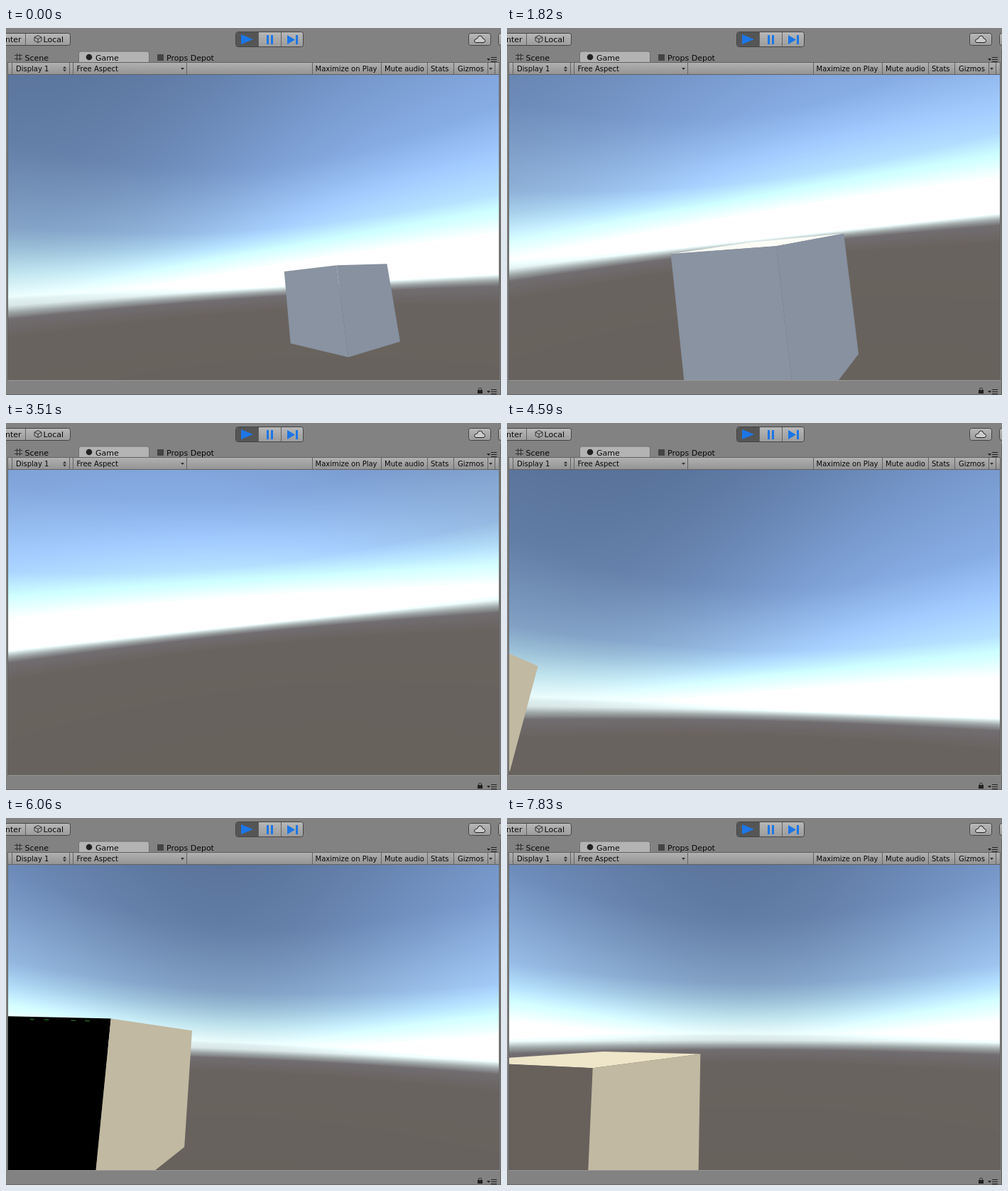
An HTML page with a canvas for the animation above (7.9 s loop, 697 by 517 pixels).

```html
<!DOCTYPE html>
<html lang="en">
<head>
<meta charset="utf-8">
<title>Game view</title>
<style>
  html, body { margin: 0; width: 697px; height: 517px; overflow: hidden; background: #828282; }
  canvas { position: absolute; left: 3px; top: 66px; }
  svg { position: absolute; left: 0; top: 0; }
  text { font: 10px "DejaVu Sans", sans-serif; fill: #080808; }
  text.big { font-size: 11px; }
  .button { fill: url(#raised); stroke: #444; }
  .line { fill: none; stroke: #626262; }
  .icon { fill: none; stroke: #333; }
</style>
</head>
<body>
<canvas id="view" width="691" height="430"></canvas>
<svg width="697" height="517" viewBox="0 0 697 517">
  <defs>
    <linearGradient id="raised" x2="0" y2="1"><stop stop-color="#b8b8b8"/><stop offset="1" stop-color="#9b9b9b"/></linearGradient>
    <linearGradient id="bar" x2="0" y2="1"><stop stop-color="#b0b0b0"/><stop offset="1" stop-color="#939393"/></linearGradient>
    <g id="menu"><path d="M0 2h5l-2.5 3z" fill="#222"/><path d="M6 .5h8M6 3.5h8M6 6.5h8" stroke="#222"/></g>
  </defs>

  <rect class="button" x="-8.5" y="7.5" width="99" height="17" rx="3"/>
  <path class="line" d="M27.5 8v16"/>
  <text class="big" x="21.5" y="20" text-anchor="end">Center</text>
  <path d="M45 10.5l5 2.5v5l-5 2.5-5-2.5v-5zM40 13l5 2.5 5-2.5M45 15.5v5" fill="#aaa" stroke="#333"/>
  <text class="big" x="52.5" y="20">Local</text>

  <rect class="button" x="323.5" y="5.5" width="95" height="21" rx="3"/>
  <path d="M326 6h29v20h-29q-2 0-2-2V8q0-2 2-2z" fill="#555"/>
  <path class="line" d="M355.5 6v20M387.5 6v20"/>
  <path d="M331 9l17 7-17 7zM367 10h3v13h-3zM373 10h3v13h-3zM396 10l11 6.5-11 6.5zM408 10h3v13h-3z" fill="#1c76e6"/>

  <rect class="button" x="651.5" y="7.5" width="31" height="17" rx="3"/>
  <path d="M662 20.5h10q3-.5 2.5-3t-3-2.500q-1-4-4-4t-4 4q-4 .5-4 3t2.500 2.500z" fill="#ccc" stroke="#222"/>
  <rect class="button" x="693.5" y="7.5" width="20" height="17" rx="3"/>

  <path d="M102.5 49V36q0-3 3-3h93q3 0 3 3v13" fill="#b3b3b3" stroke="#707070"/>
  <path class="icon" d="M15.5 36v10M19.5 36v10M12 38.5h11M12 43.5h11"/>
  <text class="big" x="26.5" y="46">Scene</text>
  <circle cx="117" cy="41" r="4.3" fill="#222"/>
  <text class="big" x="126" y="46">Game</text>
  <rect x="213" y="37" width="9" height="9" fill="#444"/>
  <text class="big" x="226" y="46">Props Depot</text>
  <use href="#menu" x="677" y="41"/>

  <rect x="3" y="49" width="691" height="17" fill="url(#bar)"/>
  <path class="line" d="M2 48.5h693M3 65.5h691"/>
  <path class="line" id="dividers"/>
  <text x="14" y="61">Display 1</text>
  <text x="99.5" y="61">Free Aspect</text>
  <text x="435.5" y="61">Maximize on Play</text>
  <text x="533" y="61">Mute audio</text>
  <text x="598" y="61">Stats</text>
  <text x="636" y="61">Gizmos</text>
  <path d="M80 57l2.500-3 2.500 3zM80 58.500h5l-2.500 3zM246 56h5l-2.500 3zM680 56h5l-2.500 3z" fill="#333"/>

  <path class="line" d="M2.5 49v447M694.5 49v447"/>
  <path d="M3 496.5h692" stroke="#979797"/>
  <path d="M0 516.5h697M696.5 30v487" stroke="#686868"/>
  <path d="M664 510h7v5h-7z" fill="#222"/>
  <path class="icon" d="M665.5 510v-1q0-2 2-2t2 2v1"/>
  <use href="#menu" x="677" y="509"/>
</svg>
<script>
const LOOP = 7900, STEPS = 103;
const W = 691, H = 430, FOCAL = 372, NEAR = .05;
const SUN_HEADING = 72 * Math.PI / 180, SUN_HEIGHT = .15;
const ctx = document.getElementById('view').getContext('2d');

document.getElementById('dividers').setAttribute('d',
  [8, 89, 94, 254, 431, 528, 593, 630, 678, 688].map(x => `M${x + .5} 49v17`).join(''));

// A hand-held camera walks around a unit cube centred on the origin.
// Step, position (ahead, right, up), heading in degrees, horizon slope and offset.
const walk = [
  [0, -2.66, -2.96, .355, 32, -.0666, 79],
  [10, -2.08, -2.39, .49, 34, -.1187, 48],
  [24, -1.32, -1.68, .573, 51, -.114, 10.5],
  [46, -2.3, -.4, .4, 85, -.1027, -4.5],
  [60, -3.055, 1.383, .147, 25, .023, 117],
  [79, -1.707, 1.527, .39, -12, .042, 39.4],
  [102, -1.441, 1.548, .646, -16.9, .0024, 26.2]
];

// Monotone cubic interpolation through the keys.
function sample(keys, step) {
  const last = keys.length - 1;
  let i = 0;
  while (i < last - 1 && step >= keys[i + 1][0]) i++;
  const a = keys[i], b = keys[i + 1], span = b[0] - a[0];
  const t = (step - a[0]) / span, u = 1 - t;
  const slope = (n, c) => (keys[n + 1][c] - keys[n][c]) / (keys[n + 1][0] - keys[n][0]);
  const tangent = (n, c) => {
    const p = slope(Math.max(0, n - 1), c), q = slope(Math.min(last - 1, n), c);
    return p * q > 0 ? 2 * p * q / (p + q) : 0;
  };
  return a.slice(1).map((from, j) => {
    const c = j + 1;
    return from * (1 + 2 * t) * u * u + b[c] * t * t * (3 - 2 * t)
      + span * t * u * (u * tangent(i, c) - t * tangent(i + 1, c));
  });
}

// Camera with its level axes (right, ahead, up) in view coordinates.
function cameraAt(step) {
  const [x, y, z, degrees, slope, offset] = sample(walk, step);
  const size = Math.hypot(slope, 1, offset / FOCAL);
  const up = [slope / size, 1 / size, offset / FOCAL / size];
  const c = Math.hypot(up[0], up[1]);
  return {
    position: [x, y, z],
    heading: degrees * Math.PI / 180,
    up,
    right: [up[1] / c, -up[0] / c, 0],
    ahead: [-up[0] * up[2] / c, -up[1] * up[2] / c, c]
  };
}

function toView(camera, [x, y, z]) {
  const cos = Math.cos(camera.heading), sin = Math.sin(camera.heading);
  const right = y * cos - x * sin, ahead = x * cos + y * sin;
  return [0, 1, 2].map(i => right * camera.right[i] + ahead * camera.ahead[i] + z * camera.up[i]);
}

// Sine of elevation, then red, green and blue before sunlight; values above 255 clip.
const skyStops = [
  [-1, 102, 96, 90], [-.1, 105, 99, 95], [-.05, 113, 109, 112], [-.033, 160, 168, 168],
  [-.015, 235, 250, 250], [.01, 270, 290, 290], [.07, 222, 263, 274], [.14, 176, 218, 246],
  [.2, 149, 185, 226], [.42, 113, 144, 191], [1, 82, 108, 148]
];
const SHADES = 4096;
const palette = new Float32Array((SHADES + 1) * 3);
for (let n = 0; n <= SHADES; n++) {
  const s = n / SHADES * 2 - 1;
  const i = Math.max(1, skyStops.findIndex(stop => stop[0] >= s));
  const a = skyStops[i - 1], b = skyStops[i], t = (s - a[0]) / (b[0] - a[0]);
  for (let c = 0; c < 3; c++) palette[n * 3 + c] = a[c + 1] + (b[c + 1] - a[c + 1]) * t;
}

const image = ctx.createImageData(W, H);
image.data.fill(255);

function drawSky(camera) {
  const [ux, uy, uz] = camera.up;
  const level = Math.cos(SUN_HEIGHT);
  const [sx, sy, sz] = toView(camera, [
    level * Math.cos(SUN_HEADING), level * Math.sin(SUN_HEADING), Math.sin(SUN_HEIGHT)
  ]);
  const data = image.data;
  let p = 0;
  for (let row = 0; row < H; row++) {
    const y = H / 2 - row;
    for (let col = 0; col < W; col++, p += 4) {
      const x = col - W / 2;
      const ray = 1 / Math.sqrt(x * x + y * y + FOCAL * FOCAL);
      const s = (ux * x + uy * y + uz * FOCAL) * ray;
      let gain = 1;
      if (s > -.04) {
        const facing = (sx * x + sy * y + sz * FOCAL) * ray;
        const scatter = Math.sqrt(.75 * (1 + facing * facing));
        gain += (scatter - 1) * Math.min(1, (s + .04) / .04);
      }
      const shade = ((s + 1) * SHADES / 2 | 0) * 3;
      data[p] = palette[shade] * gain;
      data[p + 1] = palette[shade + 1] * gain;
      data[p + 2] = palette[shade + 2] * gain;
    }
  }
  ctx.putImageData(image, 0, 0);
}

// Cuts away the part of a polygon behind the lens.
function clipNear(points) {
  return points.flatMap((b, i) => {
    const a = points[(i || points.length) - 1];
    const out = [];
    if (a[2] > NEAR !== b[2] > NEAR) {
      const t = (NEAR - a[2]) / (b[2] - a[2]);
      out.push(a.map((v, c) => v + (b[c] - v) * t));
    }
    if (b[2] > NEAR) out.push(b);
    return out;
  });
}

// Fills a rectangle lying on one side of the cube, if that side is in sight.
function drawSide(camera, axis, sign, color, [u0, u1, v0, v1] = [-.5, .5, -.5, .5]) {
  if (camera.position[axis] * sign <= .5) return;
  const corners = [[u0, v0], [u1, v0], [u1, v1], [u0, v1]].map(([u, v]) => {
    const point = [];
    point[axis] = sign / 2;
    point[(axis + 1) % 3] = u;
    point[(axis + 2) % 3] = v;
    return toView(camera, point.map((value, i) => value - camera.position[i]));
  });
  ctx.beginPath();
  for (const [x, y, z] of clipNear(corners)) {
    ctx.lineTo(W / 2 + FOCAL * x / z, H / 2 - FOCAL * y / z);
  }
  ctx.closePath();
  ctx.fillStyle = color;
  ctx.fill();
}

function drawCube(camera, step) {
  const shaded = step < 50, dark = !shaded && step < 90;
  drawSide(camera, 2, 1, shaded ? '#fbfcf6' : '#efe5c9');
  drawSide(camera, 1, -1, '#8993a1');
  drawSide(camera, 0, -1, shaded ? '#8791a0' : dark ? '#000' : '#67605b');
  if (dark) {
    for (const start of [.34, .25, .07, -.03]) {
      drawSide(camera, 0, -1, '#25702c', [start, start + .03, .482, .487]);
    }
  }
  drawSide(camera, 1, 1, '#c1b9a1');
}

let shown = -1;
function tick() {
  const time = performance.now() % LOOP;
  const step = Math.min(STEPS - 1, Math.floor((time + 25) / LOOP * STEPS));
  if (step !== shown) {
    shown = step;
    const camera = cameraAt(step);
    drawSky(camera);
    drawCube(camera, step);
  }
  requestAnimationFrame(tick);
}
tick();
</script>
</body>
</html>
```
